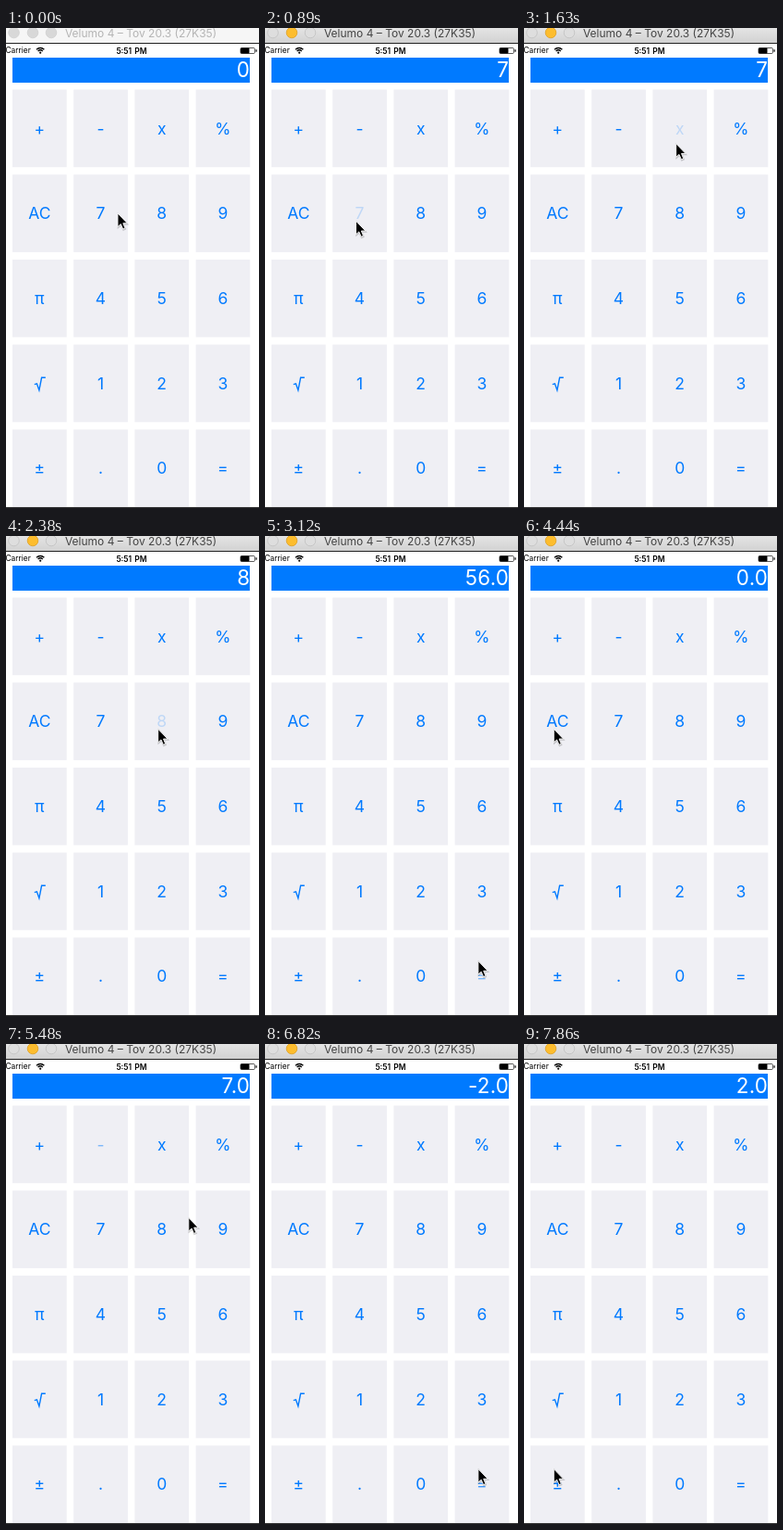
Animation, 274 px wide and 518 px high, one loop 8000 ms. Source, as an HTML page:

```html
<!DOCTYPE html>
<html lang="en">
<head>
<meta charset="utf-8">
<title>Calculator</title>
<style>
  html, body { margin: 0; width: 100%; height: 100%; overflow: hidden; background: #fff; }
  svg { display: block; width: 100vw; height: 100vh; }
  text { font-family: Inter, Roboto, sans-serif; }
  .key { font-size: 17.5px; fill: #007aff; text-anchor: middle; }
  .root { fill: none; stroke: #007aff; stroke-width: 1.4; }
</style>
</head>
<body>
<svg viewBox="0 0 274 518">
  <defs>
    <linearGradient id="bar" x2="0" y2="1">
      <stop offset="0" stop-color="#e4e4e4"/>
      <stop offset="1" stop-color="#d2d2d2"/>
    </linearGradient>
    <path id="arrow" d="M0 0V14.5L3.3 11.6L5.7 17L8 16L5.800 10.700H10.300Z"/>
  </defs>
  <rect width="274" height="518" fill="#fff"/>
  <rect id="titleBar" width="274" height="16"/>
  <g id="lights" stroke-width=".8">
    <circle cx="8.500" cy="5" r="5.800"/>
    <circle cx="29" cy="5" r="5.800"/>
    <circle cx="49" cy="5" r="5.800"/>
  </g>
  <text id="title" x="146" y="10" font-size="12" text-anchor="middle">Velumo 4 – Tov 20.3 (27K35)</text>
  <path d="M0 16.500H274" stroke="#222"/>

  <text x="-.5" y="27.300" font-size="8.400">Carrier</text>
  <path d="M33 23.200a6 6 0 0 1 8.400 0M34.600 25a3.800 3.800 0 0 1 5.200 0" fill="none" stroke="#000" stroke-width="1.300"/>
  <circle cx="37.200" cy="26.700" r="1.100"/>
  <text x="136" y="27.500" font-size="8.500" font-weight="600" word-spacing="1" text-anchor="middle">5:51 PM</text>
  <rect x="254" y="21.500" width="15.500" height="6" rx="1.300" fill="none" stroke="#333" stroke-width=".8"/>
  <rect x="254" y="21.500" width="9.500" height="6" rx="1"/>
  <rect x="270.500" y="23.300" width="1.200" height="2.400"/>

  <rect x="7" y="32" width="257" height="27" fill="#007aff"/>
  <text id="display" x="264.300" y="53.400" font-size="22.400" letter-spacing=".3" fill="#fff" text-anchor="end"></text>
  <g id="keys"></g>
  <path d="M0 517.500H274" stroke="#333"/>

  <g id="cursor">
    <use href="#arrow" x=".4" y="1" stroke="#000" stroke-width="1.400" opacity=".18"/>
    <use href="#arrow" stroke="#fff" stroke-width=".9"/>
  </g>
</svg>
<script>
const LOOP = 8000, STEP = 148.3;            // ms
const ACTIVATE = 2, GLIDE = 2, FADE = 3;    // steps
const START = { x: 121, y: 200 };
const $ = id => document.getElementById(id);

// Key pad
const labels = '+ - x % AC 7 8 9 π 4 5 6 √ 1 2 3 ± . 0 ='.split(' ');
const keys = {};
labels.forEach((label, i) => {
  const x = 36.3 + 66.2 * (i % 4), y = 108.3 + 91.7 * Math.floor(i / 4);
  add('rect', { x: x - 29.3, y: y - 41.8, width: 58.7, height: 83.7, fill: '#efeff4' });
  const el = label === '√'
    ? add('path', { d: `M${x - 5.5} ${y + 1.2}l2.6-.8 2.500 7 2.700-13.500h4.200`, class: 'root' })
    : add('text', { x, y: y + 6.3, class: 'key' });
  if (label !== '√') el.textContent = label;
  // The pointer rests a little towards the middle row.
  keys[label] = { el, rest: { x: x - 4, y: y + (292 - y) * 0.09 } };
});

function add(tag, attrs) {
  const el = document.createElementNS('http://www.w3.org/2000/svg', tag);
  for (const name in attrs) el.setAttribute(name, attrs[name]);
  return $('keys').appendChild(el);
}

// Calculator
const operators = { x: (a, b) => a * b, '-': (a, b) => a - b };
let stored = 0, operator = null;

function compute(key, shown) {
  if (key >= '0' && key <= '9') return key;
  let result = Number(shown);
  if (key === 'AC') result = 0;
  else if (key === '±') result = -result;
  else if (key === '=') result = operators[operator](stored, result);
  else [stored, operator] = [result, key];
  return result.toFixed(1);
}

// Session: each key goes down at its step and comes up one step later.
const session = '7@5 x@11 8@15 =@19 AC@23 7@31 -@35 9@38 =@43 ±@48';
let shown = '0';
const presses = session.split(' ').map(item => {
  const [key, step] = item.split('@');
  shown = compute(key, shown);
  return { key, down: Number(step), shown };
});

function cursorAt(n) {
  let { x, y } = START;
  for (const { key, down } of presses) {
    const k = Math.min(1, Math.max(0, (n - down + GLIDE) / GLIDE));
    const ease = 1 - (1 - k) ** 2, { rest } = keys[key];
    x += (rest.x - x) * ease;
    y += (rest.y - y) * ease;
  }
  return [x, y];
}

function drawWindow(active) {
  $('titleBar').setAttribute('fill', active ? 'url(#bar)' : '#f6f6f6');
  $('title').setAttribute('fill', active ? '#444' : '#b4b4b4');
  [...$('lights').children].forEach((light, i) => {
    const yellow = active && i === 1;
    light.setAttribute('fill', yellow ? '#fdbd2e' : active ? '#dedede' : '#d8d8d8');
    light.setAttribute('stroke', yellow ? '#dfa023' : active ? '#c0c0c0' : '#d0d0d0');
  });
}

function draw(time) {
  // The screen refreshes in discrete steps.
  const n = Math.floor((time % LOOP + 8) / STEP);
  const opacity = {};
  let value = '0';
  for (const { key, down, shown } of presses) {
    if (n < down) break;
    const faded = Math.max(0, n - down - 1) / FADE;
    opacity[key] = Math.min(1, 0.2 + 0.8 * faded);
    if (n > down) value = shown;
  }
  for (const key in keys) keys[key].el.setAttribute('opacity', opacity[key] ?? 1);
  $('display').textContent = value;
  drawWindow(n >= ACTIVATE);
  $('cursor').setAttribute('transform', `translate(${cursorAt(n)})`);
}

const start = performance.now();
function tick() {
  draw(performance.now() - start);
  requestAnimationFrame(tick);
}
tick();
</script>
</body>
</html>
```
